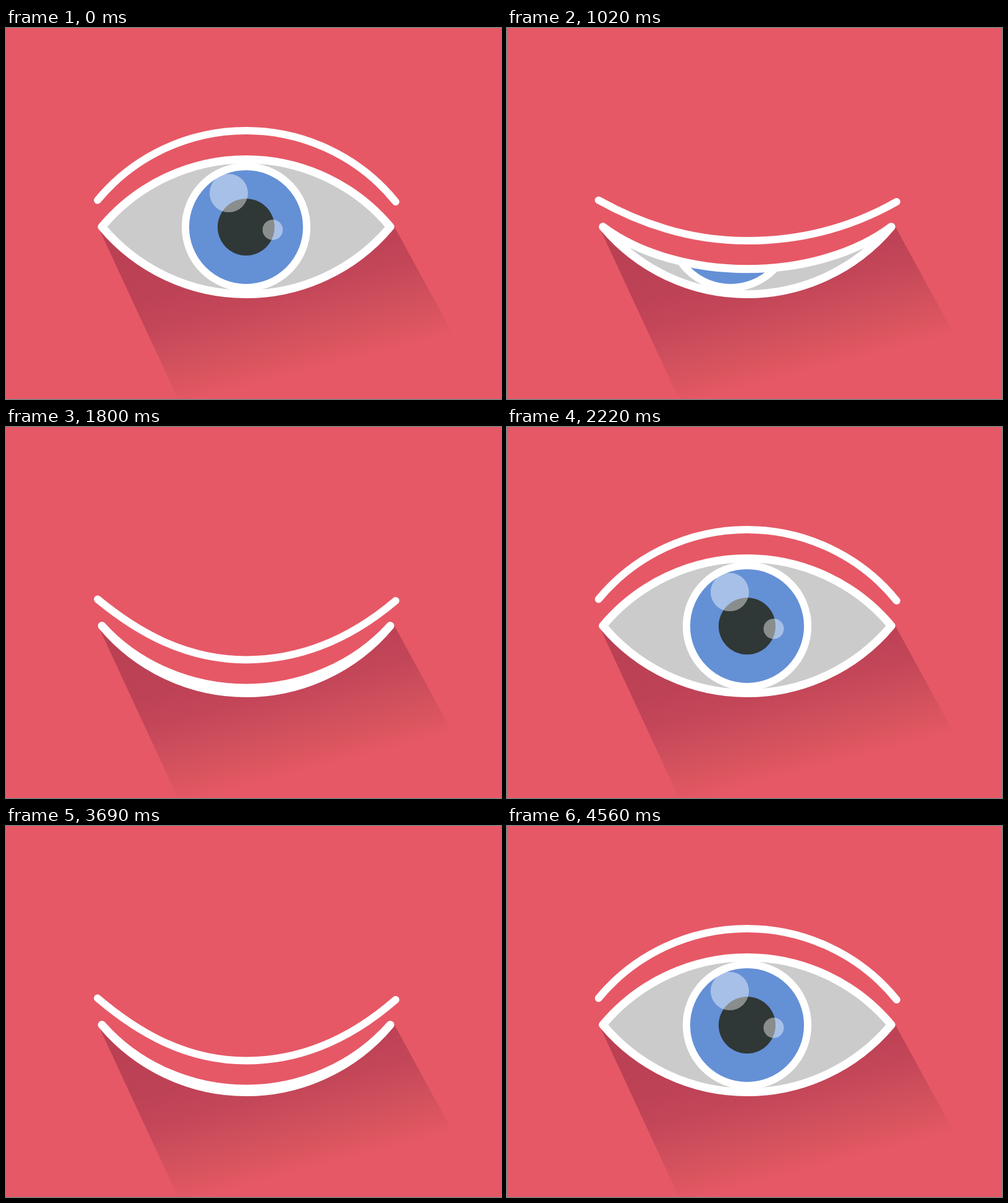
An HTML page for the animation above (5070 ms loop, 800x600 px).

```html
<!DOCTYPE html>
<html lang="en">
<head>
<meta charset="utf-8">
<title>Blinking eye</title>
<style>
  html, body { margin: 0; width: 100%; height: 100%; overflow: hidden; background: #e65866; }
  svg { display: block; width: 800px; height: 600px; }
</style>
</head>
<body>
<svg viewBox="0 0 800 600">
  <defs>
    <linearGradient id="fade" gradientUnits="userSpaceOnUse" x1="170" y1="360" x2="237.2" y2="621.4">
      <stop offset="0" stop-color="#ba4054"/>
      <stop offset=".33" stop-color="#be4256"/>
      <stop offset=".5" stop-color="#c34658"/>
      <stop offset=".7" stop-color="#cf4f5d"/>
      <stop offset=".88" stop-color="#db555f"/>
      <stop offset="1" stop-color="#e65866"/>
    </linearGradient>
    <clipPath id="opening"><path id="hole"/></clipPath>
  </defs>
  <path id="shadow" fill="url(#fade)"/>
  <g clip-path="url(#opening)">
    <rect x="140" y="190" width="500" height="260" fill="#cbcbcb"/>
    <circle id="iris" cx="388" cy="322" r="98" fill="#6490d6" stroke="#fff" stroke-width="12"/>
    <g id="pupil">
      <circle cx="388" cy="322" r="46" fill="#2f3836"/>
      <g fill="#fff" fill-opacity=".43">
        <circle cx="360" cy="267" r="31"/>
        <circle cx="431" cy="326.3" r="16.4"/>
      </g>
    </g>
  </g>
  <g fill="none" stroke="#fff" stroke-linecap="round" stroke-linejoin="round">
    <path id="lids" stroke-width="13"/>
    <path id="brow" stroke-width="12"/>
  </g>
</svg>
<script>
const LOOP = 5070, STEP = 30;
const $ = id => document.getElementById(id);
const mix = (a, b, k) => a + (b - a) * k;

// Cubic timing curve through (x1, 0) and (x2, 1).
const ease = (x1, x2) => x => {
  let lo = 0, hi = 1;
  for (let i = 0; i < 24; i++) {
    const u = (lo + hi) / 2, v = 1 - u;
    if (3 * x1 * u * v * v + 3 * x2 * u * u * v + u * u * u < x) lo = u; else hi = u;
  }
  return lo * lo * (3 - 2 * lo);
};
const sharp = ease(.67, .33), soft = ease(.55, .4);

// Rows: time, value, easing used to arrive there.
const lidKeys = [
  [150, 0], [432, 1], [792, 0], [1152, 1], [1512, 0], [1872, 1], [2220, 0],
  [2610, 0], [3550, 1], [4560, 0, soft]
];
const irisKeys = [[150, 0], [600, -82], [792, -82], [1320, 96], [1512, 96], [2100, 0]];
const pupilKeys = [[150, 0], [600, -89], [792, -89], [1320, 116], [1512, 116], [2100, 0]];

function at(keys, t) {
  const n = keys.findIndex(k => k[0] > t);
  if (n === 0) return keys[0][1];
  if (n < 0) return keys[keys.length - 1][1];
  const [t0, a] = keys[n - 1], [t1, b, curve = sharp] = keys[n];
  return mix(a, b, curve((t - t0) / (t1 - t0)));
}

const lower = "C563.5 390.4 477.7 430.5 388 430.5S212.5 390.4 155 321.5";
$("shadow").setAttribute("d", "M150 324L278 600H779.6L628 322L621 321.5" + lower + "Z");

function lidPath(p) {
  const corner = mix(252.6, 390.4, p), mid = mix(212.5, 430.5, p);
  return `M155 321.5C212.5 ${corner} 298.3 ${mid} 388 ${mid}S563.5 ${corner} 621 321.5${lower}Z`;
}

function browPath(p) {
  const mid = mix(166, 385, p);
  const left = `${mix(207, 219, p)} ${mix(207, 342, p)}`;
  const right = `${mix(571, 560, p)} ${mix(208, 345, p)}`;
  return `M148 278.5C${left} 295.3 ${mid} 388 ${mid}S${right} 629.7 281`;
}

function draw(t) {
  const p = at(lidKeys, t);
  const down = t > 2600 ? p : 0; // the gaze drops only in the slow blink
  const d = lidPath(p);
  $("hole").setAttribute("d", d);
  $("lids").setAttribute("d", d);
  $("brow").setAttribute("d", browPath(p));
  $("iris").setAttribute("transform", `translate(${at(irisKeys, t)} ${50 * down})`);
  $("pupil").setAttribute("transform", `translate(${at(pupilKeys, t)} ${108 * down})`);
}

const start = performance.now();
function tick() {
  const t = (performance.now() - start) % LOOP;
  draw(Math.floor(t / STEP) * STEP);
  requestAnimationFrame(tick);
}
tick();
</script>
</body>
</html>
```
